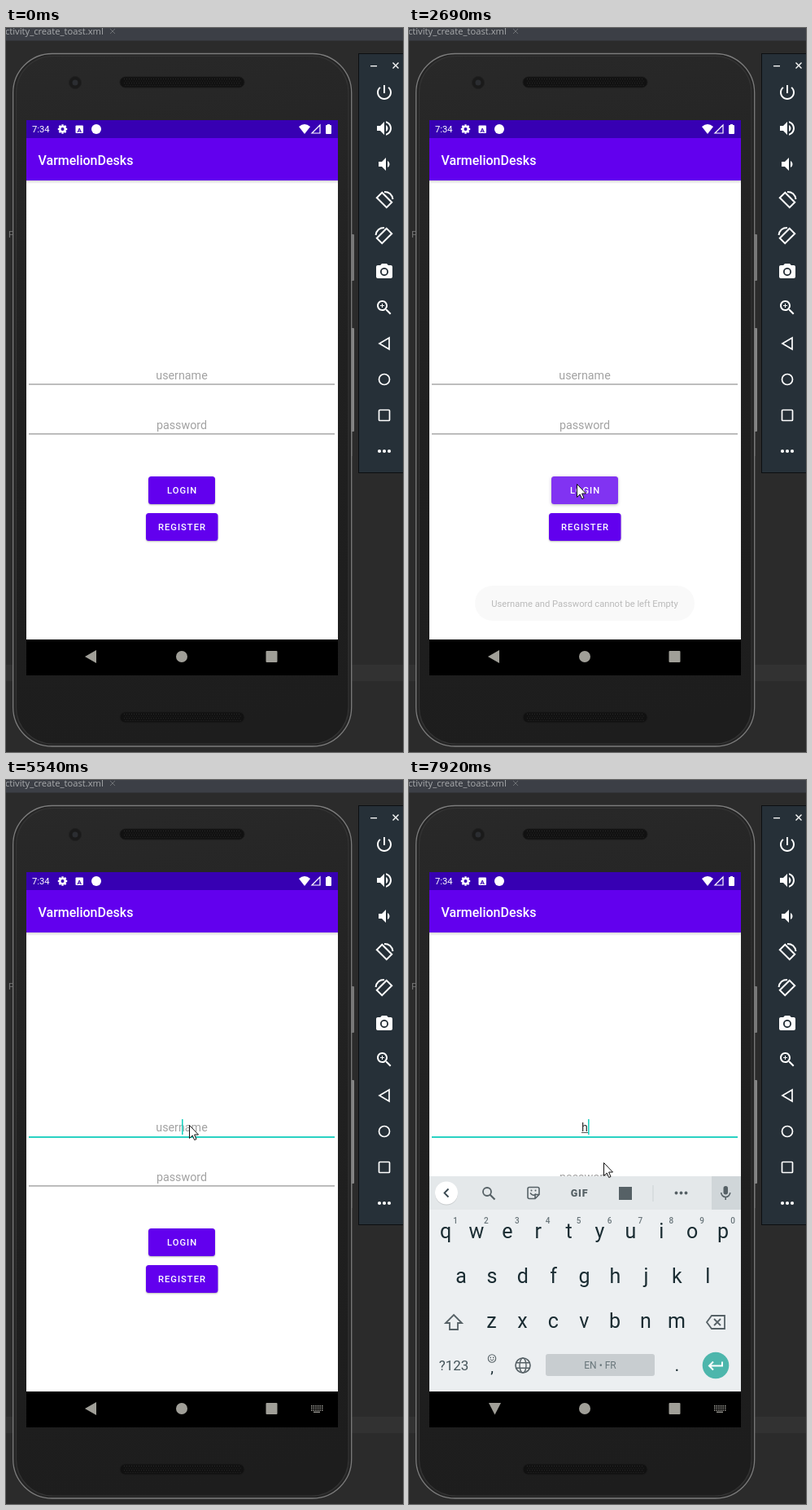
Animation, 488 px wide and 888 px high, one loop 8000 ms. Source, as an HTML page with a canvas:

```html
<!DOCTYPE html>
<html lang="en">
<head>
<meta charset="utf-8">
<title>Login screen</title>
<style>
html, body { margin: 0; width: 100%; height: 100%; overflow: hidden; background: #2b2b2b; }
canvas { display: block; width: 488px; height: 888px; }
</style>
</head>
<body>
<canvas id="stage" width="488" height="888"></canvas>
<script>
const c = document.getElementById('stage').getContext('2d');
const LOOP = 8000, TAU = Math.PI * 2;
const clamp = v => Math.max(0, Math.min(1, v));
const ramp = (t, a, b) => clamp((t - a) / (b - a));

// ---------- helpers ----------
function rect(x, y, w, h, fill) { c.fillStyle = fill; c.fillRect(x, y, w, h); }

function round(x, y, w, h, r, fill, stroke, lw = 1) {
  c.beginPath();
  c.roundRect(x, y, w, h, r);
  paint(fill, stroke, lw);
}

function paint(fill, stroke, lw = 1) {
  if (fill) { c.fillStyle = fill; c.fill(); }
  if (stroke) { c.strokeStyle = stroke; c.lineWidth = lw; c.stroke(); }
}

function circle(x, y, r, fill, stroke, lw) {
  c.beginPath();
  c.arc(x, y, r, 0, TAU);
  paint(fill, stroke, lw);
}

// Draws an SVG path with its origin at x, y.
function path(d, x, y, fill, stroke, lw = 1, scale = 1) {
  c.save();
  c.translate(x, y);
  c.scale(scale, scale);
  const p = new Path2D(d);
  if (fill) { c.fillStyle = fill; c.fill(p); }
  if (stroke) { c.strokeStyle = stroke; c.lineWidth = lw; c.stroke(p); }
  c.restore();
}

function text(s, x, y, size, color, opt = {}) {
  c.font = `${opt.weight || 400} ${size}px ${opt.family || 'Roboto'}, sans-serif`;
  c.textAlign = opt.align || 'center';
  c.letterSpacing = (opt.spacing || 0) + 'px';
  c.fillStyle = color;
  c.fillText(s, x, y);
  c.letterSpacing = '0px';
}

function dots(x, y, gap, r, color) {
  for (let i = -1; i < 2; i++) circle(x + i * gap, y, r, color);
}

// ---------- desktop and phone ----------
function drawDesktop() {
  rect(0, 0, 488, 888, '#2b2b2b');
  rect(0, 781, 488, 20, '#323232');
  rect(0, 0, 488, 16, '#3c3f46');
  rect(0, 15, 488, 1, '#333539');
  text('ctivity_create_toast.xml', -1, 8, 11.2, '#a9abad', { family: 'Open Sans', align: 'left' });
  path('M-3-3L3 3M3-3L-3 3', 131, 4, null, '#6c6f73');
  text('P', 3, 257, 11, '#777', { align: 'left' });
}

function speaker(y) {
  round(140, y, 153, 13, 6.5, '#111', '#1b1b1b');
  c.fillStyle = '#2c2c2c';
  for (let r = 0; r < 4; r++)
    for (let x = 145 + (r % 2) * 1.5; x < 289; x += 3) c.fillRect(x, y + 2 + r * 2.6, 1, 1);
}

function drawPhone() {
  round(424, 253, 4, 57, 1, '#777');
  round(424, 368, 4, 127, 1, '#858585');
  rect(424, 495, 2, 30, '#444');
  round(8.7, 31.5, 416, 849.5, 48, '#242424', '#7c7c7c', 1.3);
  const body = c.createLinearGradient(0, 32, 180, 880);
  body.addColorStop(0, '#292929');
  body.addColorStop(0.5, '#202020');
  body.addColorStop(1, '#1d1d1d');
  round(12.5, 34.5, 408.5, 843.5, 45, body, '#343434', 1.2);
  circle(85, 67, 7.5, '#1a1a1a', '#202020');
  circle(85, 67, 3.5, '#2b2d31');
  speaker(60);
  speaker(839);
}

function drawSidebar() {
  const W = '#fff';
  rect(433, 31, 55, 515, '#0c0f11');
  rect(434, 32, 54, 513, '#263038');
  rect(448, 46, 8, 1.3, W);
  path('M-3.5-3.5L3.5 3.5M3.5-3.5L-3.5 3.5', 479, 46, null, W, 1.4);

  path('M13 3h-2v10h2V3zm4.83 2.17l-1.42 1.42C17.99 7.86 19 9.81 19 12c0 3.87-3.13 7-7 7s-7-3.13-7-7c0-2.19 1.01-4.14 2.58-5.42L6.17 5.17C4.23 6.82 3 9.26 3 12c0 4.97 4.03 9 9 9s9-4.03 9-9c0-2.74-1.23-5.18-3.17-6.83z', 453, 67, W);
  path('M3 9v6h4l5 5V4L7 9H3zm13.5 3c0-1.77-1.02-3.29-2.5-4.03v8.05c1.48-.73 2.5-2.25 2.5-4.02zM14 3.23v2.06c2.89.86 5 3.54 5 6.71s-2.11 5.85-5 6.71v2.06c4.01-.91 7-4.49 7-8.77s-2.99-7.86-7-8.77z', 453, 111, W);
  path('M18.5 12c0-1.77-1.02-3.29-2.5-4.03v8.05c1.48-.73 2.5-2.25 2.5-4.02zM5 9v6h4l5 5V4L9 9H5z', 453, 155, W);

  for (const [y, flip] of [[211, 1], [255, -1]]) {
    c.save();
    c.translate(465, y);
    c.scale(flip, 1);
    path('M-2.8-9.2L9.2 2.8L2.8 9.2L-9.2-2.8ZM0-10Q9-10 10.5-1', 0, 0, null, W, 2);
    c.restore();
  }

  path('M9 2L7.17 4H4c-1.1 0-2 .9-2 2v12c0 1.1.9 2 2 2h16c1.1 0 2-.9 2-2V6c0-1.1-.9-2-2-2h-3.17L15 2H9zm3 15c-2.76 0-5-2.24-5-5s2.24-5 5-5 5 2.24 5 5-2.24 5-5 5z', 453, 287, W);
  circle(465, 299, 3.2, W);
  path('M15.5 14h-.79l-.28-.27C15.41 12.59 16 11.11 16 9.5 16 5.91 13.09 3 9.5 3S3 5.91 3 9.5 5.91 16 9.5 16c1.61 0 3.09-.59 4.23-1.57l.27.28v.79l5 4.99L20.49 19l-4.99-5zm-6 0C7.01 14 5 11.99 5 9.5S7.01 5 9.5 5 14 7.01 14 9.5 11.99 14 9.5 14z', 453, 331, W);
  path('M-2.5 0H2.5M0-2.5V2.5', 462.5, 340.5, null, W);

  path('M6-7V7L-6 0Z', 465, 387, null, W, 1.7);
  circle(465, 431, 6.5, null, W, 1.7);
  round(458.5, 468.5, 13, 13, 1, null, W, 1.7);
  dots(465, 519, 6, 2.1, W);
}

// ---------- app ----------
function drawBars() {
  const W = '#fff';
  rect(25, 113, 383, 637, '#fff');
  const shade = c.createLinearGradient(0, 187, 0, 191);
  shade.addColorStop(0, 'rgba(0,0,0,.16)');
  shade.addColorStop(1, 'rgba(0,0,0,0)');
  rect(25, 187, 383, 4, shade);
  rect(25, 113, 383, 22, '#3700b3');
  rect(25, 135, 383, 52, '#6200ee');

  text('7:34', 32, 128, 11.2, W, { align: 'left' });
  circle(69.5, 124, 3.3, null, W, 2.6);
  for (let i = 0; i < 8; i++) {
    c.save();
    c.translate(69.5, 124);
    c.rotate(i * TAU / 8);
    rect(-1.2, -5.7, 2.4, 2, W);
    c.restore();
  }
  round(85.5, 119.5, 9.5, 9.5, 1, W);
  text('A', 90.2, 127.5, 8, '#3700b3', { weight: 700 });
  circle(111, 124, 6, W);
  path('M0 6L-7-3Q0-9 7-3Z', 367, 124, W);
  path('M5-5V5H-5Z', 381, 124, null, W, 1.2);
  round(393, 119, 7, 11, 1, W);
  rect(395, 118, 3, 1, W);

  text('VarmelionDesks', 39.5, 167.5, 16, W, { weight: 500, align: 'left' });
}

function drawButton(x, y, w, label, labelX, glow) {
  c.save();
  c.shadowColor = 'rgba(0,0,0,.28)';
  c.shadowBlur = 2 + glow * 8;
  c.shadowOffsetY = 1;
  round(x, y, w, 34, 3.5, '#6200ee');
  c.restore();
  if (glow) round(x, y, w, 34, 3.5, `rgba(255,255,255,${glow})`);
  text(label, labelX, y + 21.2, 11.2, '#fff', { weight: 500, align: 'left', spacing: 1 });
}

function drawForm(t) {
  const typed = t >= 7915, focus = t >= 5375;
  if (typed) {
    text('h', 216, 431, 14.3, '#333');
    rect(212, 432, 8, 1, '#555');
  } else text('username', 216, 431, 14.3, '#a2a2a2');
  if (focus) rect(28, 437, 376, 2, '#2ad2c3');
  else rect(28, 436.4, 376, 1.2, '#929292');
  text('password', 216, 492, 14.3, '#a2a2a2');
  rect(28, 497.3, 376, 1.2, '#929292');

  const caret = focus && t < 5915 || t >= 6465 && t < 6925 || t >= 7455;
  if (caret) rect(typed ? 220 : 216, 416, 1.6, 19, '#1fd3c2');

  const glow = 0.2 * ramp(t, 2400, 2620) * (1 - ramp(t, 2760, 3080));
  drawButton(175, 550, 82, 'LOGIN', 198, glow);
  drawButton(172, 595, 88.5, 'REGISTER', 187, 0);
}

function drawToast(t) {
  const a = ramp(t, 2600, 2880) * (1 - ramp(t, 4860, 5080));
  if (!a) return;
  c.globalAlpha = a;
  round(81, 684, 270, 43, 21.5, '#eee');
  text('Username and Password cannot be left Empty', 216, 709.5, 11.2, '#484848');
  c.globalAlpha = 1;
}

function drawNav(t) {
  const G = '#a09f98';
  rect(25, 750, 383, 44, '#000');
  if (t >= 5690) path('M-7.5-7H7.5L0 7.5Z', 105.5, 771, G);
  else path('M6.5-8V8L-7.5 0Z', 104.5, 771, G);
  circle(216, 771, 7, G);
  round(319.5, 764, 14, 14, 1, G);
  if (t >= 5455) {
    for (let r = 0; r < 3; r++)
      for (let i = 0; i < 6; i++) rect(375 + i * 2.6, 767 + r * 2.6, 1.5, 1.5, G);
    rect(378, 774.6, 8, 1.3, G);
  }
}

// ---------- keyboard ----------
function drawKeyboard(t) {
  const a = ramp(t, 5570, 5765);
  if (!a) return;
  const I = '#566166', K = '#1a2c32';
  c.save();
  c.beginPath();
  c.rect(25, 486, 383, 264);
  c.clip();
  c.globalAlpha = a;
  c.translate(0, (1 - a) * 60);
  rect(25, 486, 383, 264, '#eceff1');
  rect(25, 486, 383, 41, '#e4e8ea');
  rect(372, 486, 36, 41, '#d0d6d9');

  circle(46, 507.5, 14, 'rgba(0,0,0,.12)');
  circle(46, 506.5, 14, '#fff');
  path('M2.5-5L-2.5 0L2.5 5', 46, 506.5, null, '#37474f', 1.8);
  circle(96, 505, 5, null, I, 1.8);
  path('M0 0L6 6', 99.5, 508.5, null, I, 2.2);
  path('M-7-5Q-7-7-5-7H5Q7-7 7-5V2L2 7H-5Q-7 7-7 5ZM7 2H2V7M-4 0Q0 5 3 1', 153, 506.5, null, I, 1.6);
  circle(150.5, 503.5, 1, I);
  circle(155.5, 503.5, 1, I);
  text('GIF', 209.5, 511, 12.5, I, { weight: 900, spacing: 0.8 });
  rect(258, 499, 16, 16, I);
  rect(299.5, 497, 1, 20, '#cbd1d4');
  dots(334.5, 506.5, 6, 1.9, I);
  round(386.5, 498, 5.5, 10.5, 2.7, I);
  path('M-5.5-1A5.5 5.5 0 0 0 5.5-1M0 4.5V8', 389.2, 507, null, I, 1.6);

  const rows = [['qwertyuiop', 45, 562], ['asdfghjkl', 64, 616.5], ['zxcvbnm', 101.5, 671.5]];
  rows.forEach(([keys, x, y], r) => [...keys].forEach((k, i) => {
    const kx = x + i * 37.9;
    text(k, kx, y, 25, K);
    if (!r) text((i + 1) % 10, kx + 12, 544, 10, '#6a767b', { weight: 500 });
  }));

  path('M0-9L10 1H5V9H-5V1H-10Z', 55, 665, null, I, 1.8);
  path('M-11 0L-5-8H11V8H-5ZM-2-4L6 4M6-4L-2 4', 377, 665, null, I, 1.8);

  text('?123', 55, 724, 17, '#44545a');
  circle(102, 709.5, 4.7, null, I, 1.1);
  circle(100.3, 708.4, 0.8, I);
  circle(103.7, 708.4, 0.8, I);
  path('M-2.4 1Q0 4 2.4 1', 102, 709.5, null, I);
  text(',', 102, 727, 19, K);
  circle(140, 718, 9, null, I, 1.6);
  c.beginPath();
  c.ellipse(140, 718, 4, 9, 0, 0, TAU);
  paint(null, I, 1.4);
  path('M-8.5-3.2H8.5M-8.5 3.2H8.5', 140, 718, null, I, 1.4);
  round(168, 704, 134, 27, 3, '#c8cdd0');
  text('EN • FR', 235, 722, 12, '#69767b');
  text('.', 329.5, 725, 22, K);
  circle(377, 718, 16.3, '#4db6ac');
  path('M8-5V0H-7M-3-5L-8 0L-3 5', 377, 718.5, null, '#fff', 2);
  c.restore();
}

// ---------- pointer ----------
const track = [
  [530, 437, 872], [920, 275, 752], [1300, 126, 633], [1380, 134, 616],
  [1680, 177, 531], [1990, 206, 559], [3235, 206, 559], [3460, 160, 630],
  [3620, 114, 690], [3690, 136, 716], [3850, 226, 730], [3920, 241, 730],
  [4080, 238, 699], [4500, 228, 570], [4920, 223, 443], [5080, 223, 413],
  [5170, 223, 413], [5230, 223, 420], [5380, 225, 423], [6410, 225, 423],
  [6470, 231, 424], [6700, 231, 427], [6870, 231, 427], [7310, 239, 467],
  [7630, 239, 467], [7770, 239, 469], [8100, 239, 469]
];

function drawPointer(t) {
  const i = track.findIndex(p => p[0] > t);
  if (i < 1) return;
  const [t0, x0, y0] = track[i - 1], [t1, x1, y1] = track[i];
  const k = (t - t0) / (t1 - t0);
  const x = Math.round(x0 + (x1 - x0) * k), y = Math.round(y0 + (y1 - y0) * k);
  path('M.5.5V16.5L4.2 13L6.7 18.5L9 17.5L6.6 12H11.5Z', x, y, '#fff', '#111');
}

const STEP = 76.96, LEAD = 15;
function stepTime(t) {
  return t < 530 ? 0 : 530 + LEAD + STEP * Math.floor((t - 530) / STEP + 0.1);
}

function frame() {
  const t = stepTime(performance.now() % LOOP);
  drawDesktop();
  drawPhone();
  drawSidebar();
  drawBars();
  drawForm(t);
  drawToast(t);
  drawKeyboard(t);
  drawNav(t);
  drawPointer(t);
  requestAnimationFrame(frame);
}
frame();
</script>
</body>
</html>
```
